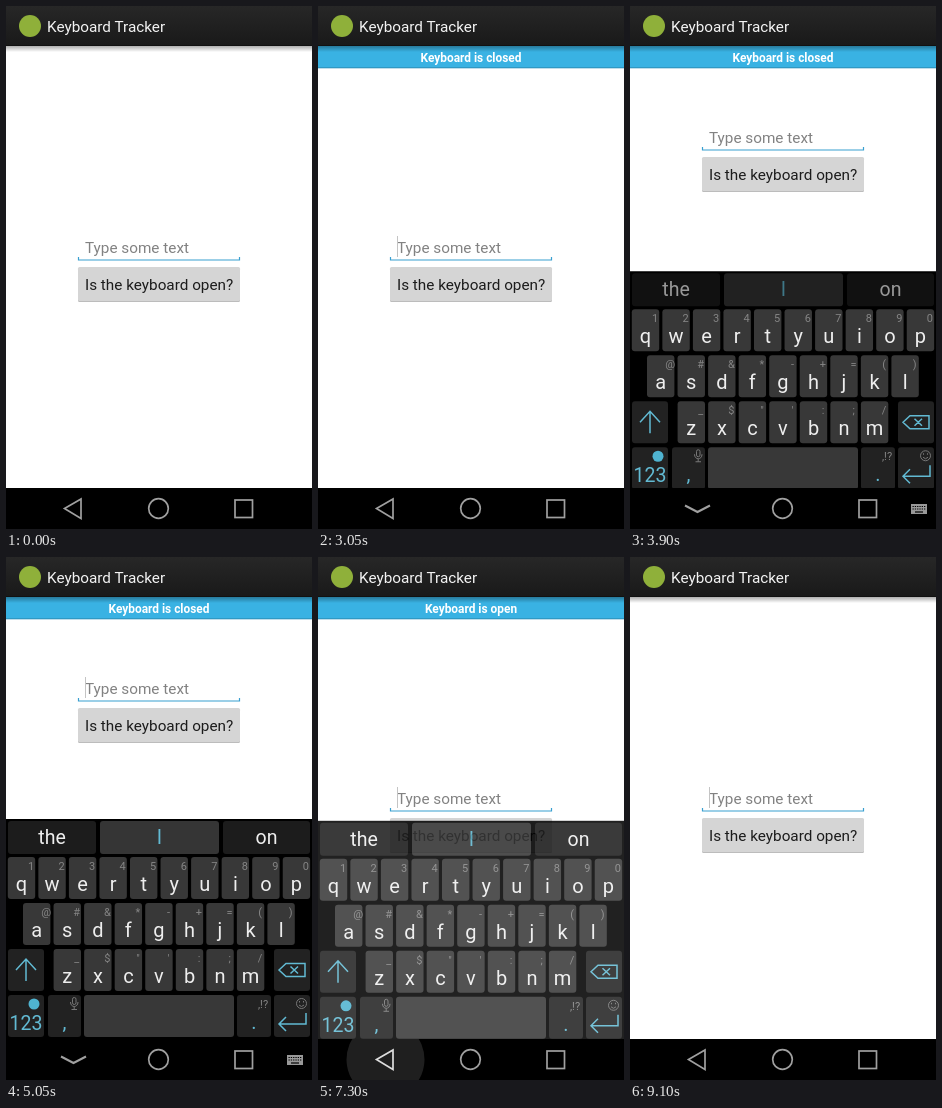
These frames come from a looping animation (306x523 px, 9.25 s). An HTML page:

```html
<!DOCTYPE html>
<html lang="en">
<head>
<meta charset="utf-8">
<title>Keyboard Tracker</title>
<style>
  html, body { margin: 0; width: 100%; height: 100%; overflow: hidden; background: #fff; }
  svg { display: block; width: 306px; height: 523px; font-family: Roboto, sans-serif; }
  .body { font-size: 15.3px; }
  .banner { font-size: 11.9px; font-weight: 700; fill: #fff; text-anchor: middle; }
  .key { font-size: 20px; fill: #eee; text-anchor: middle; }
  .word { font-size: 19.5px; fill: #eee; text-anchor: middle; }
  .hint { font-size: 11px; fill: #858585; text-anchor: middle; }
  .key.blue, .word.blue { fill: #62bad3; }
  .line { fill: none; stroke: #62bad3; stroke-width: 1.5; }
  .grey { fill: none; stroke: #777; }
  .nav { fill: none; stroke: #a0a0a0; stroke-width: 1.7; }
</style>
</head>
<body>
<svg viewBox="0 0 306 523">
  <defs>
    <linearGradient id="bar" x2="0" y2="1">
      <stop stop-color="#272727"/><stop offset="1" stop-color="#191919"/>
    </linearGradient>
    <linearGradient id="shade" x2="0" y2="1">
      <stop stop-opacity=".32"/><stop offset="1" stop-opacity="0"/>
    </linearGradient>
    <clipPath id="navClip"><rect y="482" width="306" height="41"/></clipPath>
  </defs>
  <rect width="306" height="523" fill="#fff"/>

  <g id="content" class="body">
    <text x="79" y="247" fill="#828282">Type some text</text>
    <rect id="cursor" x="79" width="1" fill="#c4c4c4"/>
    <path d="M72.5 251V254H233.5V251" fill="none" stroke="#399fd0" stroke-width="1.2"/>
    <rect x="72" y="262" width="162" height="34" rx="1.5" fill="#bcbcbc"/>
    <rect x="72" y="261" width="162" height="34" rx="1.5" fill="#d5d5d5"/>
    <text x="79" y="284" fill="#1c1c1c">Is the keyboard open?</text>
  </g>

  <g id="closed">
    <rect y="40" width="306" height="22" fill="#39b2e3"/>
    <rect y="61.3" width="306" height="1" fill="#2c8fb8"/>
    <text class="banner" x="153" y="56">Keyboard is closed</text>
  </g>
  <g id="opened">
    <rect y="40" width="306" height="22" fill="#39b2e3"/>
    <rect y="61.3" width="306" height="1" fill="#2c8fb8"/>
    <text class="banner" x="153" y="56">Keyboard is open</text>
  </g>

  <rect y="40" width="306" height="6" fill="url(#shade)"/>
  <rect width="306" height="40" fill="url(#bar)"/>
  <rect y="39" width="306" height="1" fill="#111"/>
  <circle cx="24" cy="20" r="11" fill="#8fb03a"/>
  <text class="body" x="41" y="26" fill="#f3f3f3">Keyboard Tracker</text>

  <g id="keyboard">
    <rect y="262" width="306" height="261" fill="#000"/>
    <g id="words"></g>
    <g id="keys"></g>
    <path class="line" d="M20 424V402M10 413L20 402L30 413"/>
    <path class="line" d="M273 413L280 406.500H299V419.500H280ZM284.500 409.500L292 416.500M292 409.500L284.500 416.500"/>
    <path class="line" d="M300 456V467H273M280 460L273 467L280 474"/>
    <circle cx="28" cy="447" r="5.500" fill="#4fb3d0"/>
    <rect class="grey" x="66.500" y="440.500" width="3.500" height="7" rx="1.700"/>
    <path class="grey" d="M64.500 445C64.500 451 72 451 72 445M68.200 449.500V452.500M65.500 452.500H71"/>
    <circle class="grey" cx="295.500" cy="446.500" r="5"/>
    <path class="grey" d="M293 448Q295.500 451 298 448M293.500 444V445.500M297.500 444V445.500"/>
  </g>

  <rect y="482" width="306" height="41" fill="#000"/>
  <circle id="ripple" cx="67.500" cy="502.500" r="39" fill="#fff" clip-path="url(#navClip)"/>
  <path id="back" class="nav" d="M58.500 502.500L75 493V512.500Z"/>
  <circle class="nav" cx="152.500" cy="502.500" r="9.800"/>
  <rect class="nav" x="229" y="494" width="17.500" height="17.500"/>
  <g id="imeNav">
    <path class="nav" d="M55 499.500L67.500 506L80 499.500" style="stroke-width:2"/>
    <rect x="281" y="498" width="16" height="10" fill="#999"/>
    <path d="M282.500 500.500H296M282.500 503H296" stroke="#000" stroke-width="1.200" stroke-dasharray="1.300 1"/>
    <path d="M285 506H293" stroke="#000" stroke-width="1.200"/>
  </g>
</svg>
<script>
const LOOP = 9250, STEP = 50, BANNER_H = 22, PAN = -110;
const el = id => document.getElementById(id);
const clamp = x => Math.min(1, Math.max(0, x));
const progress = (t, start, duration) => clamp((t - start) / duration);
const show = (id, on) => el(id).style.display = on ? '' : 'none';
const shift = (id, y) => el(id).setAttribute('transform', `translate(0 ${y})`);

function add(parent, tag, attrs, text) {
  const node = document.createElementNS('http://www.w3.org/2000/svg', tag);
  for (const name in attrs) node.setAttribute(name, attrs[name]);
  if (text) node.textContent = text;
  el(parent).append(node);
}
const label = (parent, cls, x, y, text) => add(parent, 'text', { class: cls, x, y }, text);
const cap = (parent, x, y, width, height, fill) =>
  add(parent, 'rect', { x, y, width, height, rx: 3, fill });

// Suggestion strip
[['the', 2, 88, '#1c1c1c'], ['I', 94, 119, '#353535'], ['on', 217, 87, '#1c1c1c']]
  .forEach(([word, x, width, fill]) => {
    cap('words', x, 264, width, 33, fill);
    label('words', word === 'I' ? 'word blue' : 'word', x + width / 2, 287, word);
  });

// Letter rows: letters, hints, centre of the first key
[['qwertyuiop', '1234567890', 15.5], ['asdfghjkl', '@#&*-+=()', 30.7], ['zxcvbnm', '_$"\':;/', 61.3]]
  .forEach(([letters, hints, first], row) => {
    const y = 300 + row * 46;
    [...letters].forEach((letter, i) => {
      const x = first + i * 30.55;
      cap('keys', x - 13.7, y, 27.4, 42, '#383838');
      label('keys', 'key', x, y + 34, letter);
      label('keys', 'hint', x + 9.5, y + 13, hints[i]);
    });
  });

// Side keys and bottom row
[[2, 392, 36], [268, 392, 36], [2, 438, 36], [42, 438, 33], [231, 438, 34], [268, 438, 36]]
  .forEach(([x, y, width]) => cap('keys', x, y, width, 42, '#222'));
cap('keys', 78, 438, 150, 42, '#383838');
label('keys', 'word blue', 20, 473, '123');
label('keys', 'key blue', 58.5, 472, ',');
label('keys', 'key blue', 248, 472, '.');
label('keys', 'hint', 257, 451, ',!?');

const smooth = p => (1 - Math.cos(p * Math.PI)) / 2;

function slideBanner(id, t, enter, leave) {
  const visible = smooth(progress(t, enter, 400)) - smooth(progress(t, leave, 400));
  show(id, visible > 0);
  shift(id, Math.round((visible - 1) * BANNER_H));
}

function render(t) {
  const open = t >= 3600 && t < 7250;
  shift('content', open ? PAN : 0);
  show('back', !open);
  show('imeNav', open);

  const early = t < 2000;
  const blink = Math.floor((t - (early ? 100 : 50)) / 500);
  show('cursor', blink % 2 === 0);
  el('cursor').setAttribute('y', early ? 237 : 230);
  el('cursor').setAttribute('height', early ? 13 : 21);

  slideBanner('closed', t, 1700, 5020);
  slideBanner('opened', t, 5370, 8700);

  const enter = progress(t, 3600, 400), exit = progress(t, 7200, 350);
  shift('keyboard', 52 * (1 - enter) ** 2 + 22 * exit ** 2);
  el('keyboard').style.opacity = progress(t, 3600, 210) * (1 - exit ** 1.6);
  el('words').style.opacity = 0.1 + 0.9 * progress(t, 3750, 250);

  const glow = progress(t, 7050, 150) * (1 - progress(t, 7350, 250));
  el('ripple').setAttribute('r', 20 + 19 * progress(t, 7050, 200));
  el('ripple').style.opacity = 0.12 * glow;
  el('back').style.stroke = glow > 0 ? '#ddd' : '';
}

let start;
function frame(now) {
  start ??= now;
  render(Math.floor(((now - start) % LOOP) / STEP) * STEP);
  requestAnimationFrame(frame);
}
render(0);
requestAnimationFrame(frame);
</script>
</body>
</html>
```
